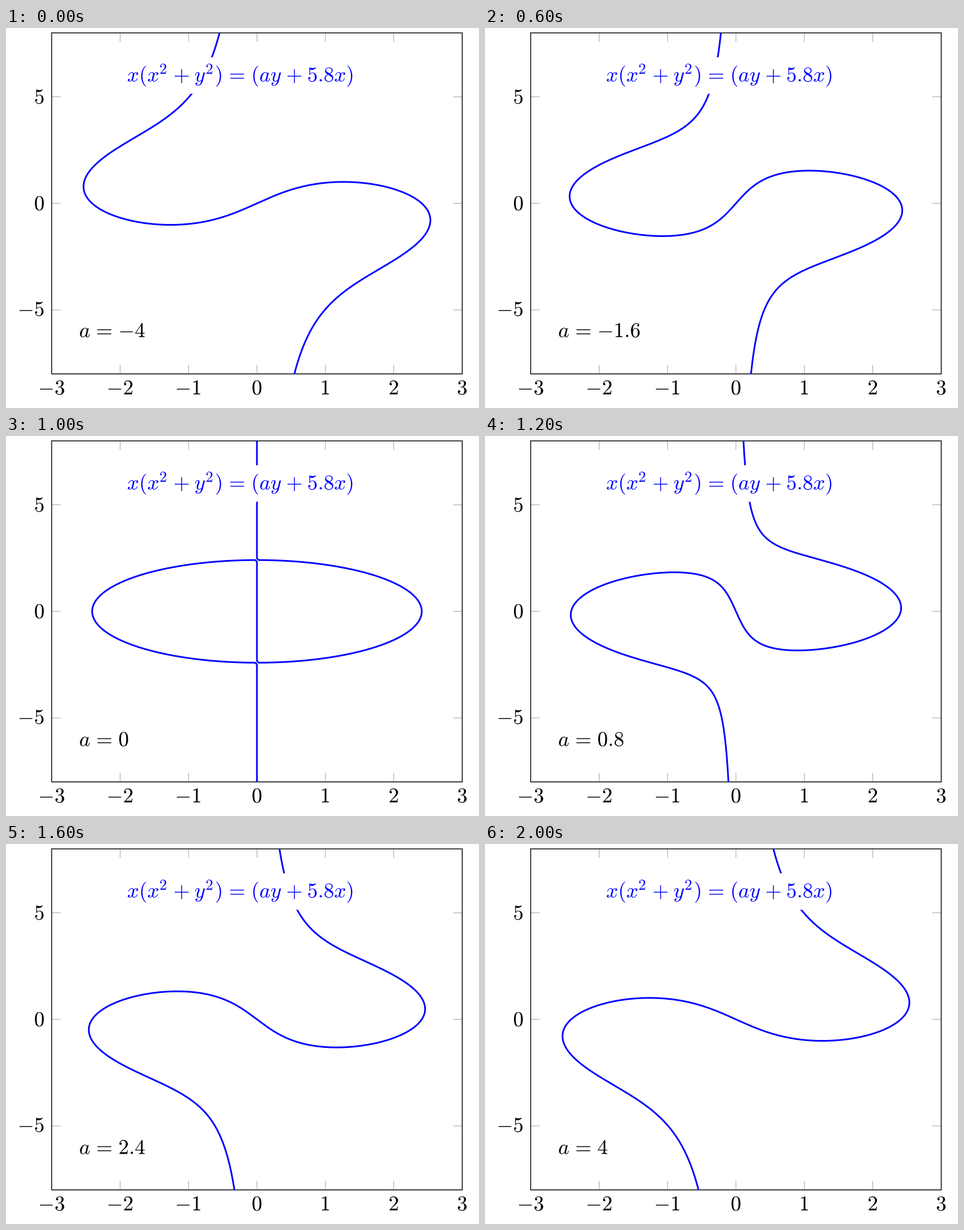
A matplotlib script for the animation above (2050 ms loop, 835 by 671 pixels).

```python
import numpy as np
import matplotlib as mpl
import matplotlib.pyplot as plt
from matplotlib.animation import FuncAnimation
from matplotlib.patches import PathPatch, Rectangle
from matplotlib.path import Path
from matplotlib.textpath import TextPath

mpl.rcParams["mathtext.fontset"] = "cm"

W, H, DPI = 835, 671, 64
FRAMES, INTERVAL = 41, 50
PT = 3.717                    # pixels per typographic point
EM = 10 * PT
SEP = EM / 3                  # padding around labels
LEFT, TOP = 80.6, 8.6
WIDTH, HEIGHT = 195 * PT, 162 * PT
UX, UY = WIDTH / 6, HEIGHT / 16
DIGIT, MINUS = 0.644, 0.083   # digit height and minus depth, in em
BLUE = (0, 0, 1)


def px(x):
    return LEFT + (np.asarray(x) + 3) * UX


def py(y):
    return TOP + (8 - np.asarray(y)) * UY


def lw(points):
    return points * PT * 72 / DPI


def gap(em):
    return r"\hspace{%.4f}" % (em / 0.878)


def spaced(sign, em):
    # mathtext already puts 0.1756 em on both sides
    return gap(em - 0.1756) + sign + gap(em - 0.1756)


PLUS, EQUALS = spaced("+", 0.222), spaced("=", 0.278)


def glyphs(x, y, tex, size=EM):
    path = TextPath((0, 0), f"${tex}$", size=size)
    return Path(path.vertices * [1, -1] + [x, y], path.codes)


def write(x, y, tex, color="black", size=EM):
    patch = PathPatch(glyphs(x, y, tex, size), fc=color, lw=0, zorder=5)
    return ax.add_patch(patch)


def number(value):
    return f"{value:g}".replace("-", "{-}")


def half_curve(a):
    """Right half of x(x^2 + y^2) = ay + 5.8x for a >= 0."""
    radius = np.sqrt(5.8)
    if a == 0:
        kx, ky = 3 / UX, 3 / UY
        end = np.arccos(kx / radius)
        t = np.linspace(-end, end, 400)
        x = np.r_[0, 0, radius * np.cos(t), 0, 0]
        y = np.r_[0, ky - radius, radius * np.sin(t), radius + ky, 9]
        return x, y
    start, end = np.arctan(-5.8 / a), np.arctan((81 - 5.8) / a)
    s = np.sin(np.linspace(0, np.pi / 2, 1200)) ** 2
    t = start + (end - start) * s
    r = np.sqrt(np.maximum(5.8 + a * np.tan(t), 0))
    return r * np.cos(t), r * np.sin(t)


def curve(a):
    x, y = half_curve(abs(a))
    if a < 0:
        y = -y
    return px(np.r_[-x[::-1], x]), py(np.r_[-y[::-1], y])


fig = plt.figure(figsize=(W / DPI, H / DPI), dpi=DPI, facecolor="white")
ax = fig.add_axes([0, 0, 1, 1])
ax.set_xlim(0, W)
ax.set_ylim(H, 0)
ax.axis("off")


def tick(x, y, dx, dy):
    ax.plot([x, x + dx], [y, y + dy], color="0.5", lw=lw(0.2),
            solid_capstyle="butt", snap=False, zorder=1)


TICK = 4.27 * PT
right, bottom = LEFT + WIDTH, TOP + HEIGHT

for v in range(-3, 4):
    x = px(v)
    if abs(v) < 3:
        tick(x, TOP, 0, TICK)
        tick(x, bottom, 0, -TICK)
    width = (0.5 + 0.778 * (v < 0)) * EM
    write(x - width / 2, bottom + SEP + DIGIT * EM, number(v))

for v in (-5, 0, 5):
    y = py(v)
    tick(LEFT, y, TICK, 0)
    tick(right, y, -TICK, 0)
    width = (0.5 + 0.778 * (v < 0)) * EM
    drop = (DIGIT - MINUS * (v < 0)) / 2 * EM
    write(LEFT - SEP - width, y + drop, number(v))

ax.add_patch(Rectangle((LEFT, TOP), WIDTH, HEIGHT, fill=False, ec="black",
                       lw=lw(0.4), snap=False, zorder=2))

line, = ax.plot([], [], color=BLUE, lw=lw(0.8), solid_joinstyle="round",
                zorder=3)
line.set_clip_path(Rectangle((LEFT, TOP), WIDTH, HEIGHT,
                             transform=ax.transData))

# Equation on a white plate
plate_h = 1.064 * EM + 2 * SEP
plate_y = py(6) - plate_h / 2
ax.add_patch(Rectangle((px(-2), plate_y), 10.8 * EM + 2 * SEP, plate_h,
                       fc="white", lw=0, snap=False, zorder=4))
eq_x = px(-2) + SEP
eq_y = plate_y + plate_h - SEP - 0.25 * EM
write(eq_x, eq_y,
      "x(x" + gap(0.448) + PLUS + "y" + gap(0.484) + ")" + EQUALS
      + "(ay" + gap(0.036) + PLUS + "5.8x)", BLUE)
for em in (1.532, 3.728):
    write(eq_x + em * EM, eq_y - 0.363 * EM, "2", BLUE, 0.72 * EM)

label = write(0, 0, "a")


def update(i):
    a = round(-4 + 0.2 * i, 1) + 0.0
    line.set_data(*curve(a))
    drop = (DIGIT - MINUS * (a < 0)) / 2 * EM
    label.set_path(glyphs(px(-2.7) + SEP, py(-6) + drop,
                          "a" + EQUALS + number(a)))
    return line, label


anim = FuncAnimation(fig, update, frames=FRAMES, interval=INTERVAL,
                     repeat=True, repeat_delay=0)
plt.show()
```
